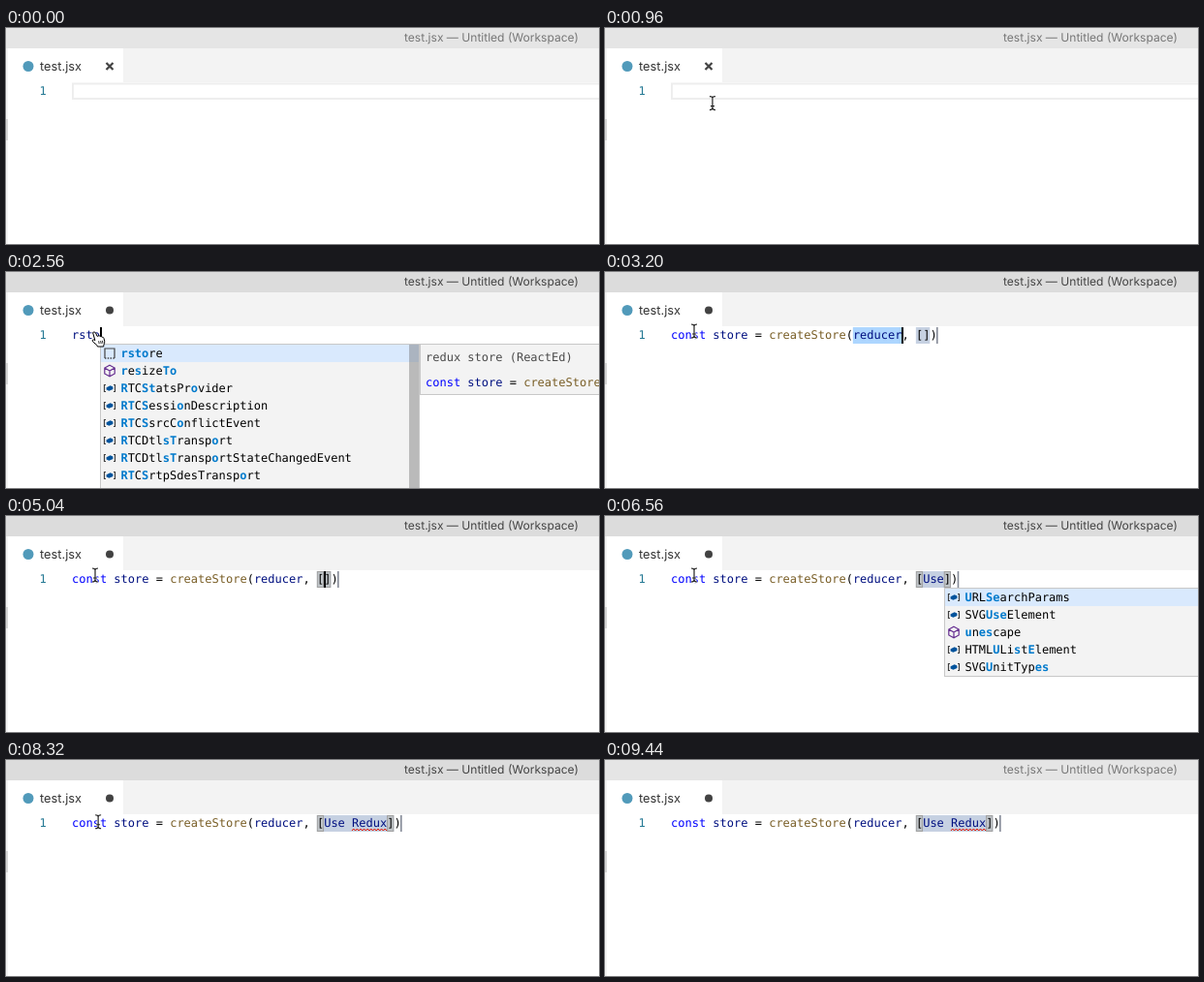
Write an HTML page that moves like this. It is 612 by 223 pixels and loops after 9520 ms.

```html
<!DOCTYPE html>
<html lang="en">
<head>
<meta charset="utf-8">
<title>Snippet completion</title>
<style>
  html, body { margin: 0; width: 100%; height: 100%; overflow: hidden; background: #fff; }
  svg { display: block; }
  text { white-space: pre; text-rendering: geometricPrecision; }
  .ui { font-family: Inter, "Open Sans", sans-serif; }
  .mono { font: 12px "DejaVu Sans Mono", "Noto Sans Mono", monospace; }
</style>
</head>
<body>
<svg id="stage" width="612" height="223" viewBox="0 0 612 223"></svg>
<script>
const LOOP = 9520, TICK = 80, BLINK = 480;
const INSERT = 3120, TAB = 4960;
const CHAR = 7.224, LEFT = 68;
const stage = document.getElementById('stage');
const col = n => LEFT + n * CHAR;

// [time, typed text]; every entry also restarts the caret blink
const keys = [
  [1200, ''], [1760, 'r'], [1920, 'rs'], [2240, 'rst'], [2560, 'rsto'], [2800, 'rstor'],
  [INSERT, ''], [TAB, ''], [5520, 'U'], [6000, 'Us'], [6080, 'Use'], [6720, 'Use '],
  [6960, 'Use R'], [7200, 'Use Re'], [7440, 'Use Red'], [7760, 'Use Redu'], [7840, 'Use Redux']
];

// [time, prefix, column where the prefix starts]
const popups = [
  [1840, 'r', 0], [2000, 'rs', 0], [2240, 'rst', 0], [2560, 'rsto', 0], [2880, 'rstor', 0],
  [INSERT, ''], [5600, 'U', 36], [6160, 'Use', 36], [6720, ''],
  [7040, 'R', 40], [7280, 'Re', 40], [7520, 'Red', 40], [7760, 'Redu', 40], [7840, '']
];

// Kind letter, then the label
const words = {
  r: 'k:readonly m:releaseEvents m:removeEventListener m:requestAnimationFrame k:require m:resizeBy m:resizeTo k:return',
  rs: 's:rstore m:resizeBy m:resizeTo m:releaseEvents m:removeEventListener m:requestAnimationFrame v:RTCStatsProvider v:RTCSessionDescription',
  rst: 's:rstore m:resizeTo m:removeEventListener m:requestAnimationFrame v:RTCStatsProvider v:RTCSessionDescription v:RTCSsrcConflictEvent v:RTCDtlsTransport',
  rsto: 's:rstore m:resizeTo v:RTCStatsProvider v:RTCSessionDescription v:RTCSsrcConflictEvent v:RTCDtlsTransport v:RTCDtlsTransportStateChangedEvent v:RTCSrtpSdesTransport',
  rstor: 's:rstore v:RTCStatsProvider v:RTCDtlsTransport v:RTCDtlsTransportStateChangedEvent v:RTCSrtpSdesTransport m:requestAnimationFrame',
  U: 'v:URL v:URLSearchParams v:Uint8Array v:Uint16Array v:Uint32Array v:UIEvent k:undefined m:unescape',
  Use: 'v:URLSearchParams v:SVGUseElement m:unescape v:HTMLUListElement v:SVGUnitTypes',
  R: 'f:reducer s:reducer k:readonly m:releaseEvents m:removeEventListener m:requestAnimationFrame k:require m:resizeBy',
  Re: 'f:reducer s:reducer v:ReadableStream v:ReadableStreamReader k:readonly m:releaseEvents m:removeEventListener k:require',
  Red: 'f:reducer s:reducer v:ReadableStream v:ReadableStreamReader k:readonly v:VRDisplayEvent v:VRFrameData v:RTCSessionDescription',
  Redu: 'f:reducer s:reducer'
};

const stroke = (d, color, w = 1.2, more = '') =>
  `<path d="${d}" fill="none" stroke="${color}" stroke-width="${w}" ${more}/>`;
const rect = (x, y, w, h, fill, more = '') =>
  `<rect x="${x}" y="${y}" width="${w}" height="${h}" fill="${fill}" ${more}/>`;
const span = (s, color, more = '') => `<tspan fill="${color}" ${more}>${s}</tspan>`;
const mono = (x, y, body, fill = '#000') => `<text class="mono" x="${x}" y="${y}" fill="${fill}">${body}</text>`;
const ui = (x, y, size, fill, body) =>
  `<text class="ui" x="${x}" y="${y}" font-size="${size}" fill="${fill}">${body}</text>`;

const icons = {
  k: stroke('M-6-3.5h5M1-3.5h5M-6 0h7M3 0h3M-6 3.5h4M0 3.5h6', '#555', 1.5),
  m: stroke('M0-5.8L5.2-3V3L0 5.8-5.2 3V-3zM-5.2-3L0 0 5.2-3M0 0V5.8', '#652d90'),
  v: stroke('M-4-3.5h-1.5v7h1.5M4-3.5h1.5v7h-1.5', '#424242') +
    '<path d="M-3.4-.8L.6-2.8 3.4-1.4V1L-.6 2.8-3.4 1.6z" fill="#00539c"/>',
  s: stroke('M-5 5V-5H5V5', '#424242') + stroke('M-5 5H5', '#424242', 1.4, 'stroke-dasharray="1.4 1.4"'),
  f: stroke('M-4-6H1L4.5-2.5V6H-4zM1-6v3.5h3.5', '#424242', 1.1)
};

const last = (rows, t) => rows.filter(r => r[0] <= t).pop();

function subsequence(word, pattern) {
  const hits = [];
  let from = 0;
  for (const c of pattern) {
    const i = word.indexOf(c, from);
    if (i < 0) return null;
    hits.push(i);
    from = i + 1;
  }
  return hits;
}

// Fuzzy match that allows one swapped pair and prefers the fewest runs
function highlight(label, prefix) {
  const p = prefix.toLowerCase(), tries = [p];
  for (let i = 1; i < p.length - 1; i++) tries.push(p.slice(0, i) + p[i + 1] + p[i] + p.slice(i + 2));
  const runs = hits => hits.filter((h, i) => h !== hits[i - 1] + 1).length;
  const found = tries.map(s => subsequence(label.toLowerCase(), s)).filter(Boolean);
  const best = found.sort((a, b) => runs(a) - runs(b))[0] || [];
  return [...label].map((c, i) => best.includes(i) ? span(c, '#007acc', 'font-weight="bold"') : c).join('');
}

const panel = (x, w, h) => rect(x + .5, 74.5, w, h, '#f3f3f3', 'stroke="#c8c8c8"');

function popup(t) {
  const [since, prefix, start] = last(popups, t) || [0, ''];
  if (!prefix) return '';
  const items = words[prefix].split(' '), full = items.length > 7;
  const x = Math.round(col(start + prefix.length));
  let out = panel(x, 329, full ? 218 : items.length * 18 + 1);
  if (start === 0 && t >= 2080) {
    out += panel(x + 330, 329, 52) + mono(x + 336, 92, 'redux store (ReactEd)', '#4a4a4a') +
      mono(x + 336, 118, span('const', '#00f') + span(' store', '#001080') + ' = ' + span('createStore', '#795e26'));
  }
  out += rect(x + 1, 75, 328, 18, '#d9e9fd');
  items.forEach((item, i) => {
    const [kind, label] = item.split(':'), y = 84 + i * 18;
    out += `<g transform="translate(${x + 10} ${y})">${icons[kind]}</g>` +
      mono(x + 21.4, y + 4, highlight(label, prefix));
  });
  // The scroll thumb grows as the matches get fewer, and fades in with the list
  if (full)
    out += rect(x + 319, 75, 10, 18 * prefix.length ** 2, '#646464', `opacity="${t < 1920 ? .12 : .4}"`);
  return out;
}

function editor(t, active) {
  const [since, typed] = last(keys, t) || [0, ''];
  const inserted = t >= INSERT, tabbed = t >= TAB;
  const end = 36 + typed.length;
  let out = '', caret = typed.length;
  if (t < 1920) out += rect(69, 57.5, 560, 15.5, 'none', 'stroke="#eee" stroke-width="2"');
  if (inserted) {
    caret = tabbed ? end : 33;
    if (tabbed) {
      out += rect(col(35), 57, (end - 34) * CHAR, 17, '#c6d1e2');
      for (const c of [35, end])
        out += rect(col(c) + .5, 57.5, CHAR - 1, 16, '#c0c5c9', 'stroke="#a0a0a0"');
    } else {
      out += rect(col(26), 57, 7 * CHAR, 17, '#add6ff') + rect(col(35), 57, 2 * CHAR, 17, '#c6d1e2');
    }
    out += rect(col(end + 2) - .5, 57, 1.6, 17, '#858b98');
    out += mono(LEFT, 69, span('const', '#00f') + span(' store', '#001080') + ' = ' +
      span('createStore', '#795e26') + '(' + span('reducer', '#001080') + ', [' + span(typed, '#001080') + '])');
  } else {
    out += mono(LEFT, 69, typed, '#001080');
  }
  if (t >= 8160)
    out += stroke(`M${col(40)} 73` + 'l1.8-2 1.8 2'.repeat(10), '#e51400', 1);
  if (active && Math.floor((t - since) / BLINK) % 2 === 0)
    out += rect(Math.round(col(caret)), 57, 2, 17, '#000');
  return out;
}

function pointer(t) {
  if (t < 320 || t >= 8880) return '';
  if (t >= 1280 && t < INSERT)
    return '<path d="M89.6 62.6q1.4-1.6 2.9.2l1.6 3.6 1.3-.5q1.2-.3 1.8.7 1-.6 1.9.6 1.2-.4 1.8 1l.8 3q.4 2.2-.8 4l-.2 1.8h-6.3l-.6-1.6-4.4-3.6q-1-1.8 1-1.9l1.5.7z" fill="#fff" stroke="#000" stroke-linejoin="round"/>' +
      stroke('M95.6 71.2l.6 3M97.6 71l.6 3M99.4 70.8l.5 3', '#000', .8);
  // Distance from rest: slides in, and later out, through the bottom edge
  const away = t < 1280 ? (1 - (t - 240) / 1040) ** 2 : Math.max(0, (t - 8240) / 640) ** 2;
  const d = 'M-3-7q3 0 3 2V5q0 2-3 2M3-7q-3 0-3 2M0 5q0 2 3 2M-2 3h4';
  return `<g transform="translate(${92 + 200 * away} ${61 + 175 * away})">` +
    stroke(d, '#fff', 2.6) + stroke(d, '#222') + '</g>';
}

function frame(active, dirty) {
  return rect(0, 0, 612, 223, '#fff') +
    rect(0, 0, 612, 21, active ? '#dcdcdc' : '#e5e5e5') +
    ui(411, 14, 12.05, active ? '#444' : '#777', 'test.jsx — Untitled (Workspace)') +
    rect(0, 21, 612, 35, '#f3f3f3') + rect(2, 21, 119, 35, '#fff') +
    rect(0, 56, 2, 167, '#f3f3f3') + rect(0, 94, 2, 22, '#d6d6d6') +
    '<circle cx="23" cy="39.5" r="5.5" fill="#519aba"/>' +
    ui(35, 44, 12.8, '#333', 'test.jsx') +
    (dirty ? '<circle cx="107" cy="39.5" r="4" fill="#424242"/>'
           : stroke('M103.5 36l7 7m0-7l-7 7', '#424242', 2.2)) +
    mono(34.6, 69, '1', '#237893');
}

let shown = '';
function draw(now) {
  const t = Math.floor(now % LOOP / TICK) * TICK;
  const active = t >= 1200 && t < 9440;
  const picture = frame(active, t >= 1760) + editor(t, active) + popup(t) + pointer(t);
  if (picture !== shown) stage.innerHTML = shown = picture;
  requestAnimationFrame(draw);
}
draw(0);
</script>
</body>
</html>
```
